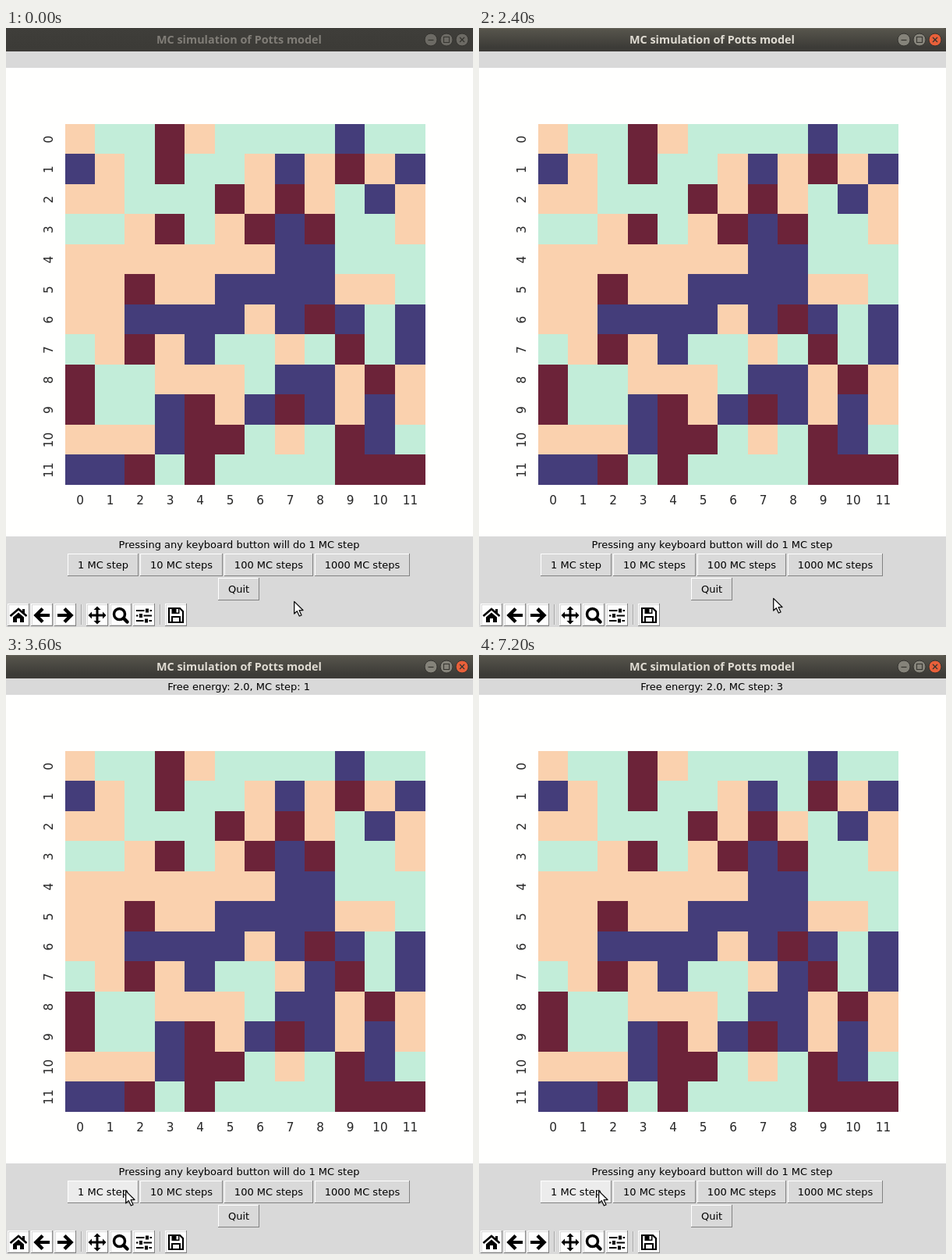
These frames come from a looping animation (599x767 px, 8000 ms). An HTML page with a canvas:

```html
<!DOCTYPE html>
<html lang="en">
<head>
<meta charset="utf-8">
<title>MC simulation</title>
<style>
html, body { margin: 0; width: 599px; height: 767px; overflow: hidden; background: #d9d9d9; }
canvas { display: block; }
</style>
</head>
<body>
<canvas id="stage" width="599" height="767"></canvas>
<script>
const ctx = document.getElementById('stage').getContext('2d');
const LOOP = 8000;
const SANS = '"DejaVu Sans", sans-serif';
const UI_FONT = '13px ' + SANS;
const TICK_FONT = '15.28px ' + SANS;
const TITLE_FONT = 'bold 14.4px "Noto Sans", "Open Sans", sans-serif';
const GREY = '#d9d9d9', HOVER = '#ececec', DARK = '#828282';

const SPIN = { O: '#fad1ae', M: '#c2edd9', R: '#6c2339', B: '#443d7a' };
const LATTICE = [
  'OMMROMMMMBMM',
  'BOMRMMOBOROB',
  'OOMMMROROMBO',
  'MMORMORBRMMO',
  'OOOOOOOBBMMM',
  'OOROOBBBBOOM',
  'OOBBBBOBRBMB',
  'MOROBMMOMRMB',
  'RMMOOOMBBORO',
  'RMMBROBRBOBO',
  'OOOBRRMOMRBM',
  'BBRMRMMMMRRR'
];
// spin flips: [time, row, column, spin]
const FLIPS = [[3600, 7, 8, 'B'], [5400, 1, 8, 'M']];

// pointer stops: [time, x, y]
const POINTER = [
  [0, 369, 733], [600, 370, 733], [800, 376, 731], [1200, 377, 731],
  [1600, 377, 730], [2200, 377, 729], [2800, 325, 719], [3000, 290, 711],
  [3200, 164, 685], [3400, 153, 685]
];
const FOCUS_AT = 2400;
const PRESSES = [3400, 5200, 6600];
const RELEASES = [3600, 5400, 7200];

const BUTTONS = [
  ['1 MC step', 79, 673, 91],
  ['10 MC steps', 172, 673, 106],
  ['100 MC steps', 280, 673, 114],
  ['1000 MC steps', 396, 673, 122],
  ['Quit', 272, 704, 53]
];

function rect(x, y, w, h, color) {
  ctx.fillStyle = color;
  ctx.fillRect(x, y, w, h);
}

function text(str, x, y, font, color) {
  ctx.font = font;
  ctx.fillStyle = color;
  ctx.textAlign = 'center';
  ctx.fillText(str, x, y);
}

function trace(points, closed) {
  ctx.beginPath();
  points.forEach(([x, y]) => ctx.lineTo(x, y));
  if (closed) ctx.closePath();
}

function line(points, width) {
  trace(points);
  ctx.lineWidth = width;
  ctx.stroke();
}

function shape(points) {
  trace(points, true);
  ctx.fill();
}

function bevel(x, y, w, h, face, sunken) {
  rect(x, y, w, h, sunken ? '#ffffff' : DARK);
  rect(x, y, w - 1, h - 1, sunken ? DARK : '#ffffff');
  rect(x + 1, y + 1, w - 2, h - 2, face);
}

function titleBar(focused) {
  const fill = ctx.createLinearGradient(0, 0, 0, 25);
  fill.addColorStop(0, focused ? '#58564d' : '#3f3e3a');
  fill.addColorStop(1, '#3c3b37');
  rect(0, 0, 599, 30, fill);
  if (focused) rect(3, 0, 593, 1, '#66645b');
  text('MC simulation of Potts model', 299, 20, TITLE_FONT, focused ? '#dfdbd2' : '#807d77');

  [545, 565, 585].forEach((x, i) => {
    const isClose = i === 2;
    ctx.beginPath();
    ctx.arc(x, 15, 8, 0, Math.PI * 2);
    ctx.fillStyle = focused ? (isClose ? '#e8603a' : '#85837a') : '#6c6a64';
    ctx.fill();
    ctx.lineWidth = 1;
    ctx.strokeStyle = '#34332f';
    ctx.stroke();
    ctx.strokeStyle = '#35342f';
    if (i === 0) line([[x - 3.5, 15.5], [x + 3.5, 15.5]], 1.2);
    if (i === 1) ctx.strokeRect(x - 3.5, 11.5, 7, 7);
    if (isClose) {
      line([[x - 3, 12], [x + 3, 18]], 1.3);
      line([[x + 3, 12], [x - 3, 18]], 1.3);
    }
  });
}

function plot(t) {
  rect(0, 51, 599, 600, '#fffffe');
  const left = i => Math.floor(i === 12 ? 538 : i ? 75.9 + 38.5 * i : 76);
  const top = i => Math.floor(123 + 38.5 * i);
  for (let r = 0; r < 12; r++) {
    for (let c = 0; c < 12; c++) {
      let spin = LATTICE[r][c];
      for (const [at, row, col, next] of FLIPS) {
        if (t >= at && row === r && col === c) spin = next;
      }
      rect(left(c), top(r), left(c + 1) - left(c), top(r + 1) - top(r), SPIN[spin]);
    }
  }
  for (let i = 0; i < 12; i++) {
    const mid = 38.5 * (i + 0.5);
    text(i, 75.8 + mid, 610, TICK_FONT, '#262626');
    ctx.save();
    ctx.translate(60, 123.3 + mid);
    ctx.rotate(-Math.PI / 2);
    text(i, 0, 0, TICK_FONT, '#262626');
    ctx.restore();
  }
}

function controls(t) {
  const hovered = t >= 3200 ? 0 : t >= 3000 ? 1 : -1;
  const pressed = PRESSES.some((p, i) => t >= p && t < RELEASES[i]);
  text('Pressing any keyboard button will do 1 MC step', 299, 666, UI_FONT, '#000');
  BUTTONS.forEach(([label, x, y, w], i) => {
    const down = pressed && i === hovered;
    const shift = down ? 2 : 0;
    bevel(x, y, w, 29, i === hovered ? HOVER : GREY, down);
    text(label, x + w / 2 + shift, y + 19 + shift, UI_FONT, '#000');
  });
}

function arrow(dir) {
  line([[-7 * dir, 0], [10 * dir, 0]], 4);
  line([[dir, -8.5], [-7.5 * dir, 0], [dir, 8.5]], 4.5);
}

const ICONS = [
  [16, function home() {
    line([[-10.5, 1], [0, -8], [10.5, 1]], 2.6);
    ctx.fillRect(5, -8, 3, 6);
    shape([[-7, 2.5], [0, -3.5], [7, 2.5], [7, 9], [2, 9], [2, 4], [-2, 4], [-2, 9], [-7, 9]]);
  }],
  [46, () => arrow(1)],
  [76, () => arrow(-1)],
  [117, function pan() {
    for (let i = 0; i < 4; i++) {
      line([[0, 0], [8, 0]], 3);
      shape([[7, -4.5], [11.5, 0], [7, 4.5]]);
      ctx.rotate(Math.PI / 2);
    }
  }],
  [147, function zoom() {
    ctx.beginPath();
    ctx.arc(-1.5, -1.5, 7, 0, Math.PI * 2);
    ctx.lineWidth = 3.5;
    ctx.stroke();
    ctx.lineCap = 'round';
    line([[4, 4], [8.5, 8.5]], 4.5);
  }],
  [177, function sliders() {
    [[-6, 4], [0.5, -4], [7, 3]].forEach(([y, x]) => {
      line([[-10, y], [10, y]], 2);
      rect(x - 3.5, y - 3, 7, 6, '#fdfdfd');
      rect(x - 2, y - 2.5, 4, 5, '#000');
    });
  }],
  [218, function save() {
    trace([[-9, -9], [5, -9], [9, -5], [9, 9], [-9, 9]], true);
    ctx.lineWidth = 2.2;
    ctx.stroke();
    ctx.fillRect(-5.5, -9, 10, 7);
    rect(0.5, -8, 2.5, 4.5, '#fdfdfd');
    ctx.lineWidth = 2;
    ctx.strokeRect(-5, 2, 10, 7);
  }]
];

function toolbar() {
  for (const [x, draw] of ICONS) {
    bevel(x - 14, 737, 28, 29, GREY);
    rect(x - 12, 739, 25, 25, '#fdfdfd');
    ctx.save();
    ctx.translate(x, 752);
    ctx.fillStyle = ctx.strokeStyle = '#000';
    draw();
    ctx.restore();
  }
  for (const x of [96, 197]) {
    rect(x, 738, 1, 26, '#a8a8a8');
    rect(x + 1, 738, 1, 26, '#e6e6e6');
  }
}

function pointer(t) {
  const [, x, y] = POINTER.filter(p => p[0] <= t).pop();
  ctx.save();
  ctx.translate(x, y);
  trace([[0.7, 1.4], [0.7, 17], [4.3, 13.7], [7.3, 20], [10, 18.8], [7.1, 12.7], [12, 12.5]], true);
  ctx.fillStyle = '#fff';
  ctx.fill();
  ctx.strokeStyle = '#111';
  ctx.lineWidth = 1.3;
  ctx.lineJoin = 'round';
  ctx.stroke();
  ctx.restore();
}

function render(t) {
  rect(0, 0, 599, 767, GREY);
  titleBar(t >= FOCUS_AT);
  const step = RELEASES.filter(at => t >= at).length;
  if (step) text(`Free energy: 2.0, MC step: ${step}`, 298.7, 45, UI_FONT, '#000');
  plot(t);
  controls(t);
  toolbar();
  pointer(t);
}

const start = performance.now();
function tick(now) {
  render(Math.max(0, now - start) % LOOP);
  requestAnimationFrame(tick);
}
render(0);
requestAnimationFrame(tick);
</script>
</body>
</html>
```
